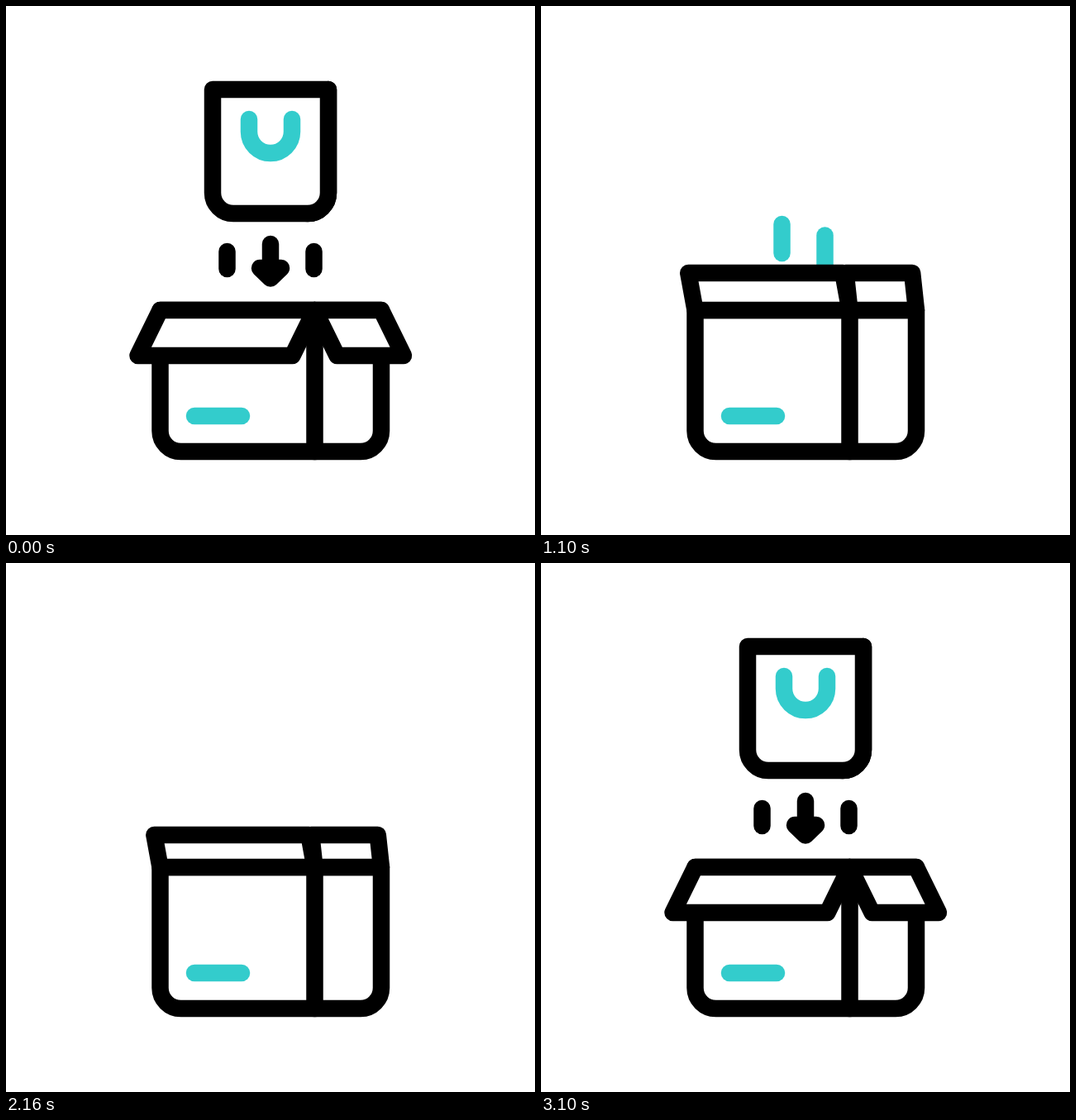
An HTML page with a canvas for the animation above (3180 ms loop, 640 by 640 pixels).

```html
<!DOCTYPE html>
<html>
<head>
<meta charset="utf-8">
<style>
html, body { margin: 0; width: 100%; height: 100%; overflow: hidden; background: #fff; }
canvas { display: block; width: 640px; height: 640px; }
</style>
</head>
<body>
<canvas id="stage" width="640" height="640"></canvas>
<script>
const c = document.getElementById('stage').getContext('2d');
const LOOP = 3180, BLACK = '#000', TEAL = '#33cccc';
const DEPTH = 275; // distance from the resting bag down into the box
const LIFT = 35;   // how far the bag rises before it drops

const lerp = (a, b, k) => a + (b - a) * k;
const unit = (t, a, b) => Math.min(1, Math.max(0, (t - a) / (b - a)));
const smooth = (t, a, b) => { const k = unit(t, a, b); return k * k * (3 - 2 * k); };

function shape(d, color = BLACK, filled = false) {
  const path = new Path2D(d);
  c.fillStyle = '#fff';
  if (filled) c.fill(path);
  c.strokeStyle = color;
  c.stroke(path);
}

function at(y, paint) {
  c.save();
  c.translate(0, y);
  paint();
  c.restore();
}

// Line that grows out of a point, then shrinks towards its far end
function streak(t, x, y, length, degrees, start, time) {
  const head = length * smooth(t, start, start + time);
  const tail = length * smooth(t, start + time, start + 2 * time);
  if (head <= tail) return;
  const a = degrees * Math.PI / 180;
  const point = r => `${x + r * Math.cos(a)} ${y + r * Math.sin(a)}`;
  shape(`M${point(tail)}L${point(head)}`, TEAL);
}

// Three rays, the middle one longest
function rays(t, x, y, gap, tilt, slope, start, time, lag) {
  for (let i = -1; i <= 1; i++) {
    const off = Math.abs(i);
    streak(t, x + gap * i, y - slope * i, 39 - 13 * off, 39 * i - tilt, start + lag * off, time);
  }
}

function bagState(t) {
  if (t < 2500) {
    const y = -LIFT * smooth(t, 220, 440);
    return { y: lerp(y, DEPTH, unit(t, 440, 690) ** 2.35), turn: smooth(t, 220, 500) };
  }
  const left = 1 - unit(t, 2500, 3080);
  return { y: DEPTH * left ** 2.66, turn: left ** 2.3 };
}

function arrow(t, y) {
  const up = Math.min(y, 0);
  const down = 10 * (smooth(t, 220, 440) - smooth(t, 2740, 2980));
  const tip = 317 + down;
  for (const x of [267.5, 372.5]) shape(`M${x} ${297 + up}V${318 + down}`);
  shape(`M320 ${288 + up}V${tip}`);
  shape(`M307 ${tip}H333L320 ${tip + 12.5}Z`);
}

function bag(p) {
  const left = 250 + 12 * p, front = 390 - 15 * p, side = 390 + 20 * p;
  const a = 294 + 9 * p, b = 346 - 13 * p;
  shape(`M${front} 101H${side}V${226 - 2 * p}a25 25 0 0 1-25 25L${front - 25} 251Z`, BLACK, true);
  shape(`M${left} 101H${front}V226a25 25 0 0 1-25 25H${left + 25}a25 25 0 0 1-25-25Z`, BLACK, true);
  shape(`M${a} 137V152A${(b - a) / 2} 26 0 0 0 ${b} 152V137`, TEAL);
}

function flap(x1, x2, tipX, tipY) {
  shape(`M${x1} 368H${x2}L${x2 + tipX} ${368 + tipY}H${x1 + tipX}Z`, BLACK, true);
}

function box(t) {
  // Flaps stand up from closed, then fall outwards; closing runs the other way
  const raised = 1 - smooth(t, 1010, 1290) + smooth(t, 1920, 2320);
  const fallen = 1 - smooth(t, 830, 1010) + smooth(t, 2320, 2500);
  const swing = Math.sin(fallen * Math.PI / 2);
  const tipY = lerp(-60 * raised, 55, fallen);

  shape('M186.5 368V514a25 25 0 0 0 25 25H429a25 25 0 0 0 25-25V368Z', BLACK, true);
  shape('M373.5 368V539');
  shape('M228 496H285', TEAL);
  flap(186.5, 373.5, lerp(-11 * raised, -27, swing), tipY);
  flap(373.5, 454, lerp(-6.5 * raised, 27, swing), tipY);
}

// The bag pushes the box down; shutting the flaps makes it bounce
const boxShift = t =>
  20 * Math.sin(Math.PI * unit(t, 640, 980)) - 3 * Math.sin(2 * Math.PI * unit(t, 1300, 1620));

function draw(now) {
  const t = now % LOOP;
  c.clearRect(0, 0, 640, 640);
  c.lineWidth = 20.5;
  c.lineCap = c.lineJoin = 'round';

  const { y, turn } = bagState(t);
  if (y < 95) arrow(t, y);
  for (let i = 0; i < 2; i++)
    streak(t, 291.5 + 52 * i, 109 + 69 * i, 190, 90, 773 + 40 * i, 190);
  if (y < DEPTH) at(y, () => bag(turn));
  at(boxShift(t), () => box(t));

  rays(t, 323.5, 319.7, 44, 93, 2.3, 1300, 110, 0);
  rays(t, 319, 84, 50, 90, 0, 2680, 170, 50);
}

const begin = performance.now();
function loop() {
  draw(performance.now() - begin);
  requestAnimationFrame(loop);
}
loop();
</script>
</body>
</html>
```
